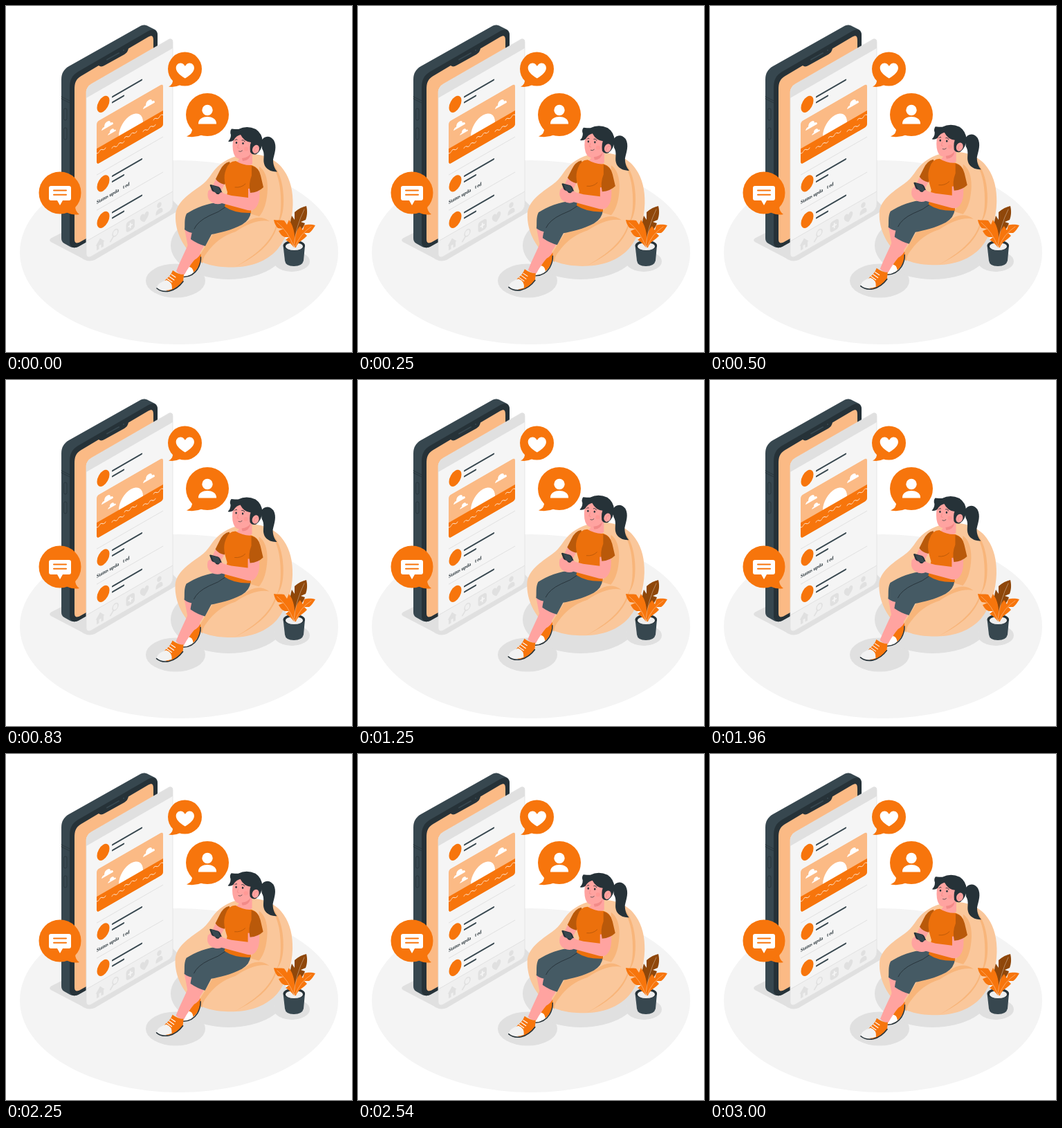
An HTML page for the animation above (3.04 s loop, 500 by 500 pixels).

```html
<!DOCTYPE html>
<html lang="en">
<head>
<meta charset="utf-8">
<title>Reading the feed</title>
<style>
html, body { margin: 0; width: 100%; height: 100%; overflow: hidden; background: #fff; }
svg { display: block; width: 100vw; height: 100vh; }
.o { fill: #f7750c; }
.shirt { fill: #ec700c; }
.deep { fill: #b9590a; }
.brown { fill: #8f470a; }
.light { fill: #fbba85; }
.dark { fill: #263238; }
.slate { fill: #37474f; }
.denim { fill: #455a64; }
.skin { fill: #ffa3a0; }
.shade { fill: #f8b57a; }
.w { fill: #fff; }
.g { fill: #e0e0e0; }
.line { fill: none; stroke-linecap: round; stroke-linejoin: round; }
text { font: bold 7.3px "Liberation Serif", serif; }
</style>
</head>
<body>
<svg viewBox="0 0 500 500">
<defs>
  <path id="cloud" d="M0 0Q1-4 4-3Q4-9 9-8.500Q13-8 13-4Q17-4 17 0Z"/>
  <path id="wave" d="M0 0q2-2.500 4.500 0t4.500 0t4.500 0t4.500 0"/>
  <g id="post">
    <ellipse cx="24.500" cy="3" rx="9" ry="10.800" class="o"/>
    <path d="M38 0H80M38 8H54" class="line" stroke="#37474f" stroke-width="2.200"/>
  </g>
  <path id="heart" d="M0 11C-8 6-12.500 1-12.500-4C-12.500-11-4-14 0-6.500C4-14 12.500-11 12.500-4C12.500 1 8 6 0 11Z"/>
  <clipPath id="photo"><rect x="15" y="59" width="96" height="62" rx="4"/></clipPath>
  <clipPath id="sheet"><rect width="125" height="249" rx="7"/></clipPath>
</defs>

<ellipse cx="250" cy="356" rx="230" ry="133" fill="#f4f4f4"/>
<g class="g">
  <path d="M65 341Q61 338 66 335L80 328L240 280L248 288Q253 292 247 297L128 367Q118 371 109 364Z"/>
  <ellipse cx="245" cy="397" rx="43" ry="24.500"/>
  <ellipse cx="322" cy="346" rx="84" ry="49"/>
  <ellipse cx="413" cy="369" rx="26" ry="15"/>
</g>

<!-- phone -->
<path class="slate" d="M80 106C80 97 84 91 91 87L195 28.500C199 27 202 27.500 205 29L215 34C218 36 219 38 219 43V283L104 348C99 350 96 349 93 348L84 343C81 341 80 339 80 335Z"/>
<path class="dark" d="M92 118C92 106 96 100 104 95L206 36C214 32 219 35 219 44V283L104 348C97 351 92 348 92 341Z"/>
<path class="light" d="M99 121C99 111 101 106 108 101.500L134 86C136 88 139 88 143 85.500L171 70C175 67.500 176 65 177 61.500L205 45C211 41.500 213 43 213 50V282L107 341C101 344 99 342 99 337Z"/>
<path class="line" stroke="#37474f" stroke-width="2" d="M146 77.500L163 68M170 64h.1"/>
<path class="line" stroke="#263238" stroke-width=".7" d="M80 131L92 137M80 134L92 140"/>
<g class="slate" stroke="#263238" stroke-width=".7">
  <rect x="83.500" y="148" width="4.500" height="17" rx="2.200"/>
  <rect x="83.500" y="176" width="4.500" height="17" rx="2.200"/>
</g>

<!-- page, in the isometric plane -->
<g transform="matrix(1 -.577 0 1 116 117)">
  <g clip-path="url(#sheet)">
    <rect width="125" height="249" fill="#f5f5f5"/>
    <rect width="125" height="16" class="g"/>
    <rect y="223" width="125" height="26" fill="#f0f0f0"/>
  </g>
  <rect width="125" height="249" rx="7" fill="none" stroke="#e0e0e0" stroke-width=".8"/>
  <use href="#post" y="36"/>
  <use href="#post" y="150.500"/>
  <use href="#post" y="203"/>
  <g clip-path="url(#photo)">
    <rect x="15" y="59" width="96" height="62" class="light"/>
    <ellipse cx="64.500" cy="98" rx="17.500" ry="20" class="w"/>
    <rect x="15" y="98" width="96" height="23" class="o"/>
    <g class="line" stroke="#fff" stroke-opacity=".75" stroke-width=".9">
      <use href="#wave" x="10" y="104"/>
      <use href="#wave" x="37" y="110"/>
      <use href="#wave" x="55" y="106"/>
      <use href="#wave" x="82" y="112"/>
      <use href="#wave" x="97" y="104"/>
    </g>
  </g>
  <g class="w">
    <use href="#cloud" x="22" y="76"/>
    <use href="#cloud" transform="translate(31 88) scale(.7)"/>
    <use href="#cloud" x="82" y="79.500"/>
  </g>
  <path d="M15 136H111M15 187H111M0 223H125" stroke="#e0e0e0"/>
  <g transform="translate(15 178) scale(.866 1)" class="dark">
    <text>Status upda<tspan x="44">t</tspan><tspan x="47.500">ed</tspan></text>
  </g>
  <!-- navigation -->
  <g class="g">
    <path d="M13.500 238L20 230L26.500 238H25V245H21.500V240H18.500V245H15V238Z"/>
    <rect x="57.500" y="229.500" width="12.500" height="15" rx="4"/>
    <use href="#heart" transform="translate(84 237) scale(.5 .6)"/>
    <ellipse cx="105.500" cy="231.500" rx="3.200" ry="3.800"/>
    <path d="M100.500 244V241Q101 236.500 105.500 236.500T110.500 241V244Z"/>
  </g>
  <ellipse cx="42" cy="235" rx="4" ry="4.600" fill="none" stroke="#e0e0e0" stroke-width="1.600"/>
  <path d="M39 239L35 243.500" class="line" stroke="#e0e0e0" stroke-width="2.200"/>
  <path d="M60.500 237H67M63.700 233.300V240.700" stroke="#f5f5f5" stroke-width="1.800"/>
</g>

<!-- bubbles -->
<g class="o">
  <circle cx="258.500" cy="91" r="24.500"/>
  <path d="M241 106Q242 113 235 116.500Q244 118 252 114Z"/>
  <circle cx="291" cy="157" r="31"/>
  <path d="M269 176Q270 185 261 188.500Q273 191 284 186Z"/>
  <circle cx="78" cy="270" r="30.500"/>
  <path d="M100 289Q100 297 106 301Q97 303 87 298Z"/>
</g>
<g class="w">
  <use href="#heart" transform="translate(258.800 93.500) scale(1.050 1)"/>
  <circle cx="291" cy="150.500" r="7.700"/>
  <path d="M278 170.500V169C279 157 303 157 304 169V170.500Z"/>
  <path d="M65 260H91Q94 260 94 263V278Q94 281 91 281H82L78 288L74 281H65Q62 281 62 278V263Q62 260 65 260Z"/>
</g>
<path d="M69 266.500H87M69 272.800H87" class="line" stroke="#f7750c" stroke-width="2"/>

<!-- girl on the beanbag -->
<g id="float">
  <path fill="#fac79b" d="M245 302C246 284 264 272 281 260C294 251 297 240 306 232C318 221 333 215 351 214C373 213 393 223 402 238C411 251 415 268 414.500 287C414 309 407 334 392 352C377 369 354 377 329 377.500C306 378 283 374 270 361C257 348 244 327 245 302Z"/>
  <path class="shade" d="M372 216C391 226 400 250 401 274C402 293 399 307 393 314C387 341 366 360 330 377.500C360 361 383 342 390 318C397 308 398 292 397 274C396 251 389 229 372 216Z"/>
  <path class="shade" d="M366 232Q378 240 378 264Q377 291 366 304L352 300L364 286Z"/>
  <path class="shade" d="M345 314Q364 299 381 311Q360 307 332 326Q306 334 290 357Q284 364 284 372Q276 366 282 357L300 328Z"/>

  <!-- far leg -->
  <path class="skin" d="M258 322L274 326L281 360Q277 368 267 371L263 348Z"/>
  <path class="o" d="M281.500 358Q283 370 276 380Q269 389 258 391L265 377L268 368Q276 367 281.500 358Z"/>
  <path class="w" d="M257 391Q257 383 264 377Q270 377 271 385Q265 391 257 391Z"/>
  <path class="line" stroke="#263238" stroke-width="1.500" d="M257 391.500Q270 391 277 380Q282 371 281.500 363"/>
  <path class="denim" d="M320 285C302 280 275 291 261 300C257 308 259 316 258 323Q264 328 272 328L300 312L330 302Z"/>

  <!-- near leg -->
  <path class="skin" d="M268 334L287 345C280 360 266 372 258 388Q251 389 246 383C252 368 260 352 268 334Z"/>
  <path class="o" d="M241 382Q249 388 257 388L256 398Q248 409 235 412L221 408L231 395Q238 390 241 382Z"/>
  <path fill="#f2f2f2" d="M218 407Q219 400 232 396Q241 399 240 409Q227 414 218 407Z"/>
  <path class="line" stroke="#fff" stroke-width="1.100" d="M233 394L240 399M236 391L243 396M239 388L245 392"/>
  <path class="line" stroke="#263238" stroke-width="1.600" d="M218 408Q225 414 236 412Q248 409 256 398"/>
  <path class="denim" d="M316 287L354 297Q353 309 341 316C326 324 308 328 297 330L288 347Q277 344 267 337C268 329 270 319 279 311Q290 300 316 287Z"/>
  <path class="line" stroke="#263238" stroke-width=".9" d="M318 290Q308 298 294 303Q277 311 272 322"/>

  <!-- far arm and body -->
  <path class="skin" d="M304 249L316 257L306 277Q297 283 292 276Q291 267 297 263Z"/>
  <path class="deep" d="M323 225Q314 227 309 238L303 250Q307 256 316 258L327 238Z"/>
  <path class="skin" d="M339 210H356V228L347 234L332 226Q340 222 339 210Z"/>
  <path class="shirt" d="M332 224Q322 224 318 236C313 248 317 258 320 269Q318 280 316 290Q331 300 354 299L356 276L367 247Q367 234 355 230Q344 231 332 224Z"/>
  <path class="line" stroke="#b9590a" stroke-width=".9" d="M331 262Q340 263 346 257M355 271L352 277"/>
  <path class="skin" d="M350 264L366 262Q368 282 362 290Q358 297 349 295L312 285Q305 288 298 284Q300 272 311 270L326 274L350 277Z"/>
  <path class="deep" d="M355 231Q365 233 368 245L372 262Q365 269 353 270Q350 257 355 245Z"/>

  <!-- handset and hands -->
  <path class="skin" d="M292 268Q290 277 295 282Q301 287 309 285L314 275Q308 267 302 271Z"/>
  <path class="dark" d="M296 258L307 261Q309 262 310 264L313 271Q313 273 311 273L301 271Q299 270 298 268L295 260Q294 258 296 258Z"/>
  <path class="slate" d="M297 259L307 262L311 271L301 269Z"/>
  <path class="skin" d="M292 267Q297 265 299 268Q305 270 304 273L294 276ZM311 269Q316 270 316 275L310 279L305 274Z"/>

  <!-- head -->
  <path class="dark" d="M369 195C373 187 382 187 387 194C392 203 388 213 386 222C386 230 388 235 392 239.500C384 240 375 236 373 228C371 221 375 214 370 206Z"/>
  <path class="skin" d="M329 188Q326 204 329 213Q332 222 340 221Q352 219 356 212V186Q340 179 329 188Z"/>
  <path fill="#f28a88" d="M341 220Q350 219 354 213Q352 224 342 224Z"/>
  <path class="dark" d="M321 195.500Q325 192 325 186Q323 181 326 177.500Q331 178 336 178Q348 172 361 178Q370 184 371 196Q370 208 362 214Q356 216 353 211Q352 202 354 197Q344 196 339 186Q333 187 329 194Q325 197 321 195.500Z"/>
  <ellipse class="skin" cx="361" cy="207" rx="4.800" ry="6.300" transform="rotate(20 361 207)"/>
  <path class="line" stroke="#f28a88" stroke-width=".8" d="M359 210Q359 204 363.500 204M336 200L334.500 205L337 205.500"/>
  <g class="dark"><ellipse cx="333" cy="197.500" rx="1.200" ry="1.600"/><ellipse cx="342.500" cy="198.500" rx="1.200" ry="1.600"/></g>
  <path class="line" stroke="#263238" stroke-width=".9" d="M331 194Q332 192 334 193M341 194Q344 193 345 196"/>
  <circle cx="347" cy="206.500" r="3" fill="#ff8f8c" opacity=".5"/>
  <path class="line" stroke="#263238" stroke-width=".7" d="M336.500 210Q339 211.500 341.500 209"/>
</g>

<!-- plant -->
<path class="slate" d="M400.500 346H432L430 368Q428 376 416 376T403 368Z"/>
<ellipse cx="416.300" cy="346" rx="15.700" ry="7.500" class="dark"/>
<ellipse cx="416.500" cy="347.500" rx="12.500" ry="5.500" fill="#eee"/>
<path class="brown" d="M415 346C410 331 409 315 413 303L417 309L417 298C422 293 429 290 434 289C436 297 435 304 433 309L426 312L432 314C429 324 420 328 417 346Z"/>
<path class="o" d="M416 349C419 336 417 320 409 309L406 316L402 310C397 309 392 310 387 309C388 315 391 319 393 321L401 322L394 325C397 331 400 333 403 334L409 334L404 338Q411 342 416 349Z"/>
<path class="o" d="M417 349C416 335 419 324 425 318L429 324L431 317C437 315 443 316 447 317C444 322 441 326 438 328L431 328L435 332C430 338 422 340 419 349Z"/>
<path class="line" stroke="#fff" stroke-opacity=".5" stroke-width=".7" d="M416 346Q419 318 431 294M416 348Q408 326 392 313M418 348Q424 330 441 319"/>
</svg>
<script>
const LOOP = 3040, RISE = 10, DRIFT = 0.8;
const float = document.getElementById("float");

function draw() {
  const phase = performance.now() % LOOP / LOOP;
  const lift = 1 - Math.abs(2 * phase - 1); // 0 to 1 and back, linear
  float.setAttribute("transform", `translate(${-DRIFT * lift} ${-RISE * lift})`);
  requestAnimationFrame(draw);
}
draw();
</script>
</body>
</html>
```
